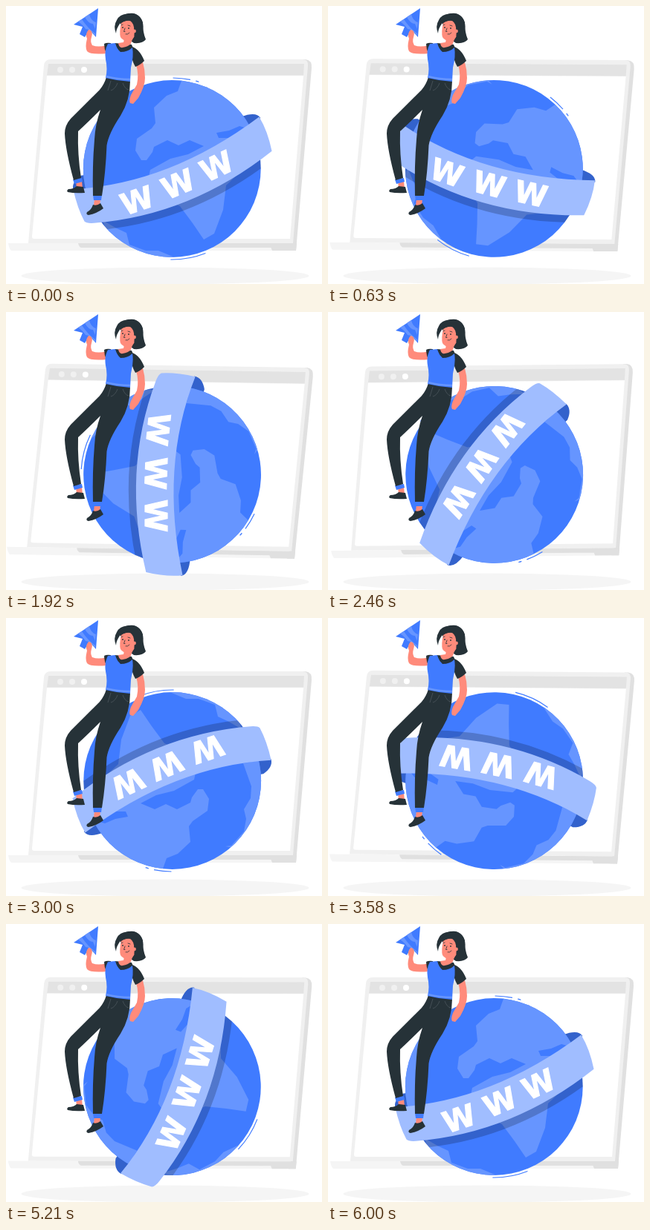
An HTML page that plays this animation: 425x375 px, repeating every 6040 ms.

```html
<!DOCTYPE html>
<html lang="en">
<head>
<meta charset="utf-8">
<title>World wide web</title>
<style>
  html, body { margin: 0; width: 100%; height: 100%; overflow: hidden; background: #fff; }
  svg { display: block; width: 425px; height: 375px; }
  .band { font: bold 40px "DejaVu Sans", sans-serif; text-anchor: middle; fill: #fff; stroke: #fff; stroke-width: 1.2; }
  .ink { fill: #263238; }
  .skin { fill: #ff8b7b; }
  .blue { fill: #407bff; }
  .light { fill: #6695ff; }
  .line { fill: none; stroke: #263238; stroke-width: .8; stroke-linecap: round; }
</style>
</head>
<body>
<svg viewBox="0 0 425 375">
  <defs>
    <clipPath id="disc"><circle cx="223.3" cy="219.5" r="119.4"/></clipPath>
    <path id="strap" transform="rotate(1.2 223.5 219.5)" d="M91 250Q221 239.5 339 147Q351 166 357 193Q249.500 282 120 295Q110 296 107 293Q97 275 91 250Z"/>
  </defs>

  <ellipse cx="214" cy="364" rx="193.500" ry="11.500" fill="#f5f5f5"/>

  <g id="laptop">
    <path fill="#e0e0e0" d="M398 72H403Q412 73 411 84L390 330H380L384 318Z"/>
    <path fill="#f0f0f0" d="M60 72H399Q407 72 406 81L386 320H30L51 80Q52 72 60 72Z"/>
    <path fill="#e3e3e3" d="M57 78H401L400 93.500H55Z"/>
    <path fill="#fff" d="M55 94H400L382 314H38Q35 314 35 311Z"/>
    <g fill="#f0f0f0">
      <circle cx="73" cy="86" r="4"/><circle cx="89" cy="86" r="4"/><circle cx="105" cy="86" r="4" fill="#fff"/>
    </g>
    <path fill="#f5f5f5" d="M3 320H356L359 330H7Q4 327 3 320Z"/>
    <path fill="#e0e0e0" d="M97 320H354L358 326H101Q98 325 97 320ZM354 320H391L390 330H358Z"/>
  </g>

  <g id="globe">
    <g id="arcs" fill="none" stroke="#407bff" stroke-width="1.200"></g>
    <path fill="#3362cc" transform="rotate(1 223.5 219.5)" d="M91 251Q88 240 101 231L130 226L122 247ZM341 149Q335 140 315 148L310 165L326 164Z"/>
    <circle class="blue" cx="223.3" cy="219.5" r="119.4"/>
    <g clip-path="url(#disc)">
      <g class="light">
        <path d="M237 98L231 115L216 121L199 137L201 158L196 165L176 179L174 195L182 208H189L197 197L199 190L217 181L232 188L247 181L266 189L245 200L221 206L194 221L190 240L215 262L234 270L251 293L266 315L280 307L292 275L296 242L345 195L360 90Z"/>
        <path d="M152 131L144 132L127 151L124 168L127 181L118 196L117 212L128 243L90 250V120Z"/>
        <path d="M130 289L147 299L162 306L166 322L188 330L205 330L229 340L150 350Z"/>
      </g>
      <path class="blue" d="M283 171L300 168L314 162L328 166L313 174L300 178H286Z"/>
      <use href="#strap" x="3.5" y="9.5" opacity=".2"/>
    </g>
    <use href="#strap" fill="#a0bdff"/>
    <g class="band">
      <text transform="translate(176 262)rotate(-19)" y="14.6">W</text>
      <text transform="translate(231 240)rotate(-23)" y="14.6">W</text>
      <text transform="translate(283 216)rotate(-25)" y="14.6">W</text>
    </g>
  </g>

  <g id="woman">
    <!-- pointer in the raised hand -->
    <path class="blue" d="M124 3L91 25L103 28L99 38L106 42L112 32L121 42Z"/>
    <path class="light" d="M112 11L106 15Q111 24 117 24L120 31L121 22Q114 20 112 11ZM102 18L97 21Q104 26 107 31L112 32L120 40V37Q110 30 102 18Z"/>
    <path class="skin" d="M135 53Q124 56 116 53Q113 48 115 42Q117 36 114 33L111 32Q106 38 109 44Q106 56 109 61Q113 66 136 64Z"/>
    <!-- near arm -->
    <path class="skin" d="M175 79Q179 93 176 106L168 120Q165 128 167 131L171 132L178 124Q187 108 187 97Q187 86 184 76Z"/>
    <path class="ink" d="M141 50Q135 49 132 51Q132 58 135 64L143 63ZM166 54Q179 56 186 74Q180 80 174 82Q168 72 166 54Z"/>
    <!-- ankles, cuffs, shoes -->
    <path class="skin" d="M94 236H102L103 246H95ZM119 260H127L126 270L118 269Z"/>
    <path class="blue" d="M90 234L102 232L103 237L92 240ZM117 255H129L128 262H118Z"/>
    <path class="ink" d="M95 243L104 244L106 252Q92 253 83 251Q81 249 84 247Q91 247 95 243ZM117 268Q122 270 127 266L131 273Q122 280 111 282Q107 281 109 278Q115 275 117 268Z"/>
    <!-- trousers -->
    <path class="ink" d="M135 96L167 101Q167 127 154 148Q138 172 135.5 188Q134 225 129 256H117Q116 215 119 180Q120 160 127 140Q110 157 97 169Q96 200 101 232L91 235Q80 195 79 172Q79 161 87 152Q109 130 126 113Q132 106 135 96Z"/>
    <path d="M141 101L137 114M150 104Q147 112 141 114M157 104Q160 112 165 113" fill="none" stroke="#59636a" stroke-width=".6"/>
    <!-- torso -->
    <path class="ink" d="M146 50L169 52L173 62L152 64Z"/>
    <path class="blue" d="M137 51L147 50Q149 58 154 62Q164 62 170 56Q172 68 168 83L167 102Q150 101 134 97Q137 85 134 72Q132 60 137 51Z"/>
    <path d="M134.500 95Q150 99 167 99" fill="none" stroke="#6695ff" stroke-width="2.500"/>
    <!-- head -->
    <path class="ink" d="M154 24Q152 11 165 10Q180 9 184 22Q184 36 188 45Q184 51 172 50Q165 46 163 36Z"/>
    <path class="skin" d="M160 40L158 49L151 50Q152 57 157 56Q164 55 168 51Q169 45 174 40Z"/>
    <path class="skin" d="M155 23Q152 36 154 42Q158 48 165 47Q172 45 174 35L174 22Q166 16 155 23Z"/>
    <path class="ink" d="M153 24Q148 31 148 37Q144 27 149 19Q153 11 162 11Q173 7 180 15Q186 23 184 33Q184 41 187 45Q181 51 170 48Q174 42 172 33Q173 24 167 20Q159 19 153 24Z"/>
    <circle class="skin" cx="172.500" cy="34" r="2.400"/>
    <circle class="ink" cx="157" cy="29" r=".9"/><circle class="ink" cx="165" cy="30" r=".9"/>
    <path class="line" d="M155 26L157 25M164 26L167 27M160 30L158.500 34.500H160M161 38Q164 39 166 36"/>
  </g>
</svg>
<script>
  const $ = id => document.getElementById(id);
  const CX = 223.5, CY = 219.5, LOOP = 6040, SPIN = 144, SWAY = 36;

  // Motion lines just outside the globe, as start and end angles in degrees
  const point = deg => {
    const a = deg * Math.PI / 180;
    return `${CX + 122.5 * Math.cos(a)} ${CY + 122.5 * Math.sin(a)}`;
  };
  $('arcs').innerHTML = [[-89.5, -78.5], [-75, -73], [68.5, 91]]
    .map(([a, b]) => `<path d="M${point(a)}A122.5 122.5 0 0 1 ${point(b)}"/>`).join('');

  // Triangle wave: 0, 1, 0, -1, 0
  const triangle = p => p < .25 ? 4 * p : p < .75 ? 2 - 4 * p : 4 * p - 4;

  function draw() {
    // Steps of 1/24 s
    const step = Math.floor(performance.now() % LOOP * .024 + .13);
    const sway = triangle(step % SWAY / SWAY);
    $('globe').setAttribute('transform', `rotate(${step / SPIN * 360} ${CX} ${CY})`);
    $('laptop').setAttribute('transform', `rotate(${sway} 207 201)`);
    requestAnimationFrame(draw);
  }
  draw();
</script>
</body>
</html>
```
